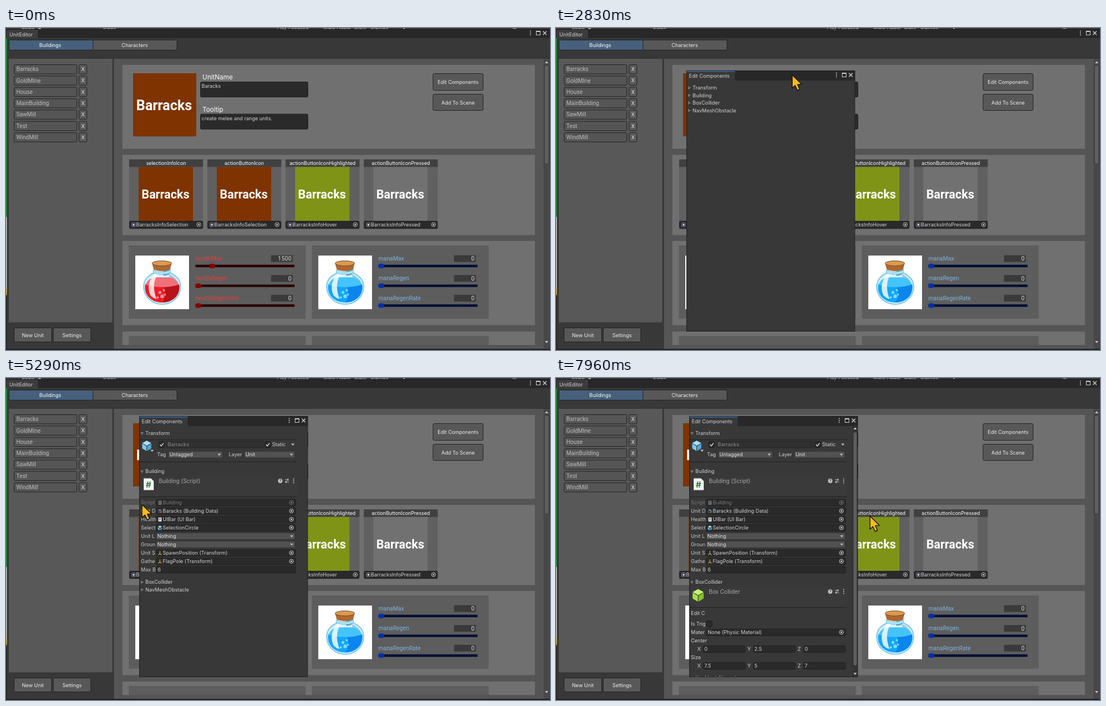
Write an HTML page that moves like this. It is 972 px wide and 576 px high and loops after 8000 ms.

```html
<!DOCTYPE html>
<html lang="en">
<head>
<meta charset="utf-8">
<title>Unit editor</title>
<style>
html, body { margin: 0; width: 100%; height: 100%; overflow: hidden; background: #383838; }
svg { display: block; width: 972px; height: 576px; }
text { white-space: pre; }
</style>
</head>
<body>
<svg id="stage" viewBox="0 0 972 576" xmlns="http://www.w3.org/2000/svg"></svg>
<script>
const LOOP = 8000;
const UI = 'Inter, sans-serif', ALT = 'Roboto, sans-serif';
const DARK = '#2a2a2a', EDGE = '#222';

// Drawing helpers; text is placed by its vertical centre.
const box = (x, y, w, h, fill, extra = '') =>
  `<rect x="${x}" y="${y}" width="${w}" height="${h}" fill="${fill}" ${extra}/>`;
const framed = (x, y, w, h, fill, stroke = EDGE, r = 2) =>
  box(x + .5, y + .5, w - 1, h - 1, fill, `stroke="${stroke}" rx="${r}"`);
const path = (d, fill, extra = '') => `<path d="${d}" fill="${fill}" ${extra}/>`;
const line = (d, stroke, w = 1) => path(d, 'none', `stroke="${stroke}" stroke-width="${w}"`);
const dot = (x, y, r, fill, extra = '') => `<circle cx="${x}" cy="${y}" r="${r}" fill="${fill}" ${extra}/>`;
const text = (x, cy, s, { size = 9, fill = '#d2d2d2', font = UI, anchor = 'start', weight = 400, gap = 0 } = {}) =>
  `<text x="${x}" y="${cy + size * .362}" font-family="${font}" font-size="${size}" font-weight="${weight}"` +
  ` fill="${fill}" text-anchor="${anchor}" letter-spacing="${gap}">${s}</text>`;
const group = (id, body, extra = '') => `<g id="${id}" ${extra}>${body}</g>`;
const range = (n, f) => Array.from({ length: n }, (_, i) => f(i)).join('');

const button = (x, y, w, h, s) =>
  framed(x, y, w, h, '#585858', EDGE, 2.5) + text(x + w / 2, y + h / 2 + .5, s, { anchor: 'middle', fill: '#eee' });
const caret = (x, y, fill = '#c4c4c4') => path(`M${x - 3} ${y - 1.5}h6l-3 3.4z`, fill);
const target = (x, y, c = '#c4c4c4') =>
  dot(x, y, 3.6, 'none', `stroke="${c}"`) + dot(x, y, 1.5, c);
const kebab = (x, y) => range(3, i => box(x - .8, y - 4.3 + i * 3.4, 1.7, 1.7, '#c8c8c8'));
const winButtons = (x, y) => kebab(x, y) +
  box(x + 10.5, y - 3.5, 7, 7, 'none', 'stroke="#ccc"') + box(x + 10, y - 4, 8, 2, '#ccc') +
  line(`M${x + 22.5} ${y - 3.2}l6.4 6.4m0 -6.4l-6.4 6.4`, '#ccc', 1.4);
const cube = (x, y, r, top, left, right) => {
  const w = r * .9, h = r / 2;
  return path(`M${x} ${y - r}l${w} ${h}l${-w} ${h}l${-w} ${-h}z`, top) +
    path(`M${x - w} ${y - h + 1}l${w - .6} ${h}v${r - .6}l${.6 - w} ${-h}z`, left) +
    path(`M${x + w} ${y - h + 1}l${.6 - w} ${h}v${r - .6}l${w - .6} ${-h}z`, right);
};
const blueCube = (x, y, r) => cube(x, y, r, '#a6e0fb', '#7cc8ee', '#4fa6d4');

function potion(x, light, dark, surface, shine) {
  return `<g transform="translate(${x} 0)">` + box(231, 407, 96, 96, '#fff') +
    path('M265 424h28v14c12 5 19 14 19 25a33 31 0 0 1-66 0c0-11 7-20 19-25z', '#d8f1fb', 'stroke="#7cc9ec" stroke-width="2"') +
    path('M281 426h11v14c-5 3-8 3-11 3z', '#5d9db5') +
    path('M290 440c9 3 17 10 19 20l-12-3z', '#9cc9da') +
    path('M249 458q30 10 60 0c4 17-9 33-30 33s-34-16-30-33z', light) +
    path('M282 462q14 0 27-4c4 17-9 33-30 33q9-10 3-29z', dark) +
    path('M249 459q6-12 16-13h28q11 2 16 13q-30 9-60 0z', surface) +
    path('M263 442q6-3 5-12h6q2 10-5 14q-9 17 0 41q-7-2-11-7q-8-18 5-36z', '#fff', 'opacity=".8"') +
    [[275, 473, 2.6], [282, 469, 2], [279, 480, 3.2], [271, 482, 2], [284, 477, 1.8]].map(b => dot(...b, shine)).join('') +
    path('M261 421l3 11q14 6 29 0l3-11z', '#b0672f') +
    `<ellipse cx="278.5" cy="421" rx="17.5" ry="4.5" fill="#d99a52" stroke="#7a4a22"/>` +
    path('M263 433q15 7 31 0v5q-16 6-31 0z', '#aee3f7', 'stroke="#63bde4" stroke-width=".8"') + '</g>';
}

function stats(x, names, values, c) {
  return box(x, 389, 316, 131, '#5d5d5d') + names.map((n, i) => {
    const y = 412 + i * 35.4, v = values[i];
    return text(x + 119, y, n, { size: 10.3, fill: c.label, font: ALT }) +
      box(x + 254, y - 5.5, 39, 12, '#3a3a3a') +
      text(x + 291, y + .6, v, { size: 10.5, font: ALT, anchor: 'end', gap: .3, fill: '#ddd' }) +
      box(x + 119, y + 11.5, 177, 4.5, c.track) +
      box(x + 119 + v / 60, y + 9.7, 10, 8, c.knob, 'rx="3"');
  }).join('');
}

function slot(x, title, color, file) {
  return box(x, 235, 132, 125, '#606060') + box(x, 235, 132, 13.5, '#404040') +
    text(x + 66, 242, title, { size: 8.8, anchor: 'middle', fill: '#fff' }) +
    box(x + 17, 248.5, 97, 97, color) +
    text(x + 65, 297, 'Barracks', { size: 21.4, weight: 600, font: ALT, anchor: 'middle', fill: '#fff' }) +
    framed(x, 345, 132, 14, DARK) +
    framed(x + 4, 348, 8, 8, '#34345a', '#777', 1) + dot(x + 8, 352, 1.7, '#ddd') +
    text(x + 12.5, 352, file) + target(x + 124.5, 351.7);
}

function editor() {
  const cut = [[28, 'Scale'], [173, '0.58x'], [484, 'Play Focused'], [567, 'Mute Audio'], [622, 'Stats'], [651, 'Gizmos'], [905, 'le']];
  const list = ['Barracks', 'GoldMIne', 'House', 'MainBuilding', 'SawMill', 'Test', 'WindMill'];
  const white = { fill: '#fff', size: 11.6 };
  return box(0, 0, 972, 576, '#383838') + box(0, 0, 972, 18, '#282828') +
    box(0, 0, 972, 2, '#3a3a3a') + cut.map(c => text(c[0], -1.3, c[1])).join('') +
    dot(60, 0, 2.5, '#aaa') + caret(711, 0) + box(0, 2, 972, 1, '#191919') +
    box(1, 3, 56, 15, '#3c3c3c') + text(6, 11.5, 'UnitEditor') + winButtons(937, 9) +
    box(0, 18, 1.5, 320, '#169a3c') + box(0, 338, 1.5, 137, '#c9c9c9') + box(0, 466, 1.5, 12, '#c9a227') + box(0, 478, 1.5, 98, '#222') +
    framed(5, 21, 151, 19, '#46607c') + framed(155, 21, 151, 19, '#585858') +
    text(79, 30.5, 'Buildings', { anchor: 'middle', fill: '#fff' }) +
    text(230, 30.5, 'Characters', { anchor: 'middle', fill: '#eee' }) +
    box(5, 54.5, 185, 472, '#585858') + box(193, 54.5, 778, 519.5, '#555') +
    box(5, 54, 185, 1, '#303030') + box(193, 54, 778, 1, '#303030') +
    list.map((s, i) => {
      const y = 65 + i * 20.3;
      return framed(14, y, 113, 17.5, '#555') + text(18.5, y + 8.6, s, { size: 10.1, font: ALT, fill: '#bdbdbd' }) +
        framed(130, y, 15, 17.5, '#585858') + text(137.5, y + 8.8, 'X', { anchor: 'middle', fill: '#eee' });
    }).join('') +
    button(14, 536, 68, 26, 'New Unit') + button(84, 536, 68, 26, 'Settings') +
    [[66, 150], [227, 143.5], [381, 150.5], [543, 24]].map(c => box(208, c[0], 737, c[1], '#707070')).join('') +
    box(227, 81, 113, 113, '#7f3300') +
    text(282.5, 138, 'Barracks', { size: 24.9, weight: 600, font: ALT, anchor: 'middle', fill: '#fff' }) +
    text(351, 88, 'UnitName', white) + framed(347, 96, 193, 28, DARK) + text(349.5, 103.7, 'Baracks') +
    text(351, 146, 'Tooltip', white) + framed(347, 153.5, 193, 28, DARK) + text(349.5, 161.5, 'create melee and range units.') +
    button(762.5, 81, 90.5, 31, 'Edit Components') + button(762.5, 118, 90.5, 30, 'Add To Scene') +
    slot(220, 'selectionInfoIcon', '#7f3300', 'BarracksInfoSelection') +
    slot(359.8, 'actionButtonIcon', '#7f3300', 'BarracksInfoSelection') +
    slot(499.6, 'actionButtonIconHighlighted', '#7f9317', 'BarracksInfoHover') +
    slot(639.4, 'actionButtonIconPressed', '#717171', 'BarracksInfoPressed') +
    stats(219.5, ['healthMax', 'healthRegen', 'healthRegenRate'], [1500, 0, 0], { label: '#e04040', track: '#2b0000', knob: '#850000' }) +
    stats(546.5, ['manaMax', 'manaRegen', 'manaRegenRate'], [0, 0, 0], { label: '#7fb2dc', track: '#000f33', knob: '#0030b0' }) +
    potion(0, '#ee1c25', '#b8121b', '#f0707a', '#f79aa2') + potion(327, '#12a5f8', '#0a86ee', '#45c4fb', '#7fdcff') +
    box(219.5, 551, 316, 16, '#5d5d5d') + box(546.5, 551, 316, 16, '#5d5d5d') +
    box(960.5, 55, 11, 519, '#484848') + framed(961.5, 66, 9, 178, '#5f5f5f', '#333', 3) +
    path('M963 63h6l-3-3.5z', '#ccc') + caret(966, 561 + .5, '#ccc') + box(0, 574, 972, 2, '#202020');
}

// Inspector parts
const field = (y, s, icon = '', c = '#d2d2d2') =>
  framed(268, y - 6.5, 250, 13, DARK, '#212121') + icon + text(icon ? 280 : 271, y, s, { fill: c }) + target(510, y - .2, c);
const popup = (x, y, w, s) =>
  framed(x, y - 6.5, w, 13, '#515151', '#303030') + text(x + 2.5, y, s, { fill: '#e4e4e4' }) + caret(x + w - 6.5, y);
const check = (x, y, on) => framed(x, y - 6, 11.5, 12, DARK, '#1c1c1c') +
  (on ? line(`M${x + 2.7} ${y}l2.3 2.6l4-5.2`, '#ddd', 1.4) : '');
const page = (x, y, c) => box(x - 2.7, y - 3.5, 5.6, 7.2, c) + text(x, y + .2, '#', { size: 5.5, anchor: 'middle', fill: '#333' });
const axes = (x, y, c) => line(`M${x} ${y - 3.5}v4.5l-3 2.5m3 -2.5l3 2.5`, c, 1.2);
const rule = y => box(238, y, 282, 1, '#222');
const header = (y, s) => box(238, y - 8, 282, 36, '#3a3a3a') + rule(y + 28) +
  text(273, y, s, { size: 9.8, fill: '#a8a8a8' }) +
  dot(490, y, 3.9, '#c4c4c4') + text(490, y, '?', { size: 6.5, anchor: 'middle', weight: 700, fill: '#333' }) +
  line(`M498.5 ${y - 2}h7m-7 4h7`, '#c4c4c4', 1.1) + line(`M503.5 ${y - 4}v4m-3 0v4`, '#c4c4c4', 1.3) + kebab(514, y);
const vector = (y, vals) => vals.map((v, i) => {
  const x = 253 + i * 89.6;
  return text(x - .5, y, 'XYZ'[i]) + framed(x + 9.5, y - 6.5, 76, 13, DARK, '#212121') + text(x + 12, y, v);
}).join('');

function transformPart() {
  return rule(110) + blueCube(251.5, 121, 9) + caret(261, 130) + check(272.5, 119, true) +
    framed(286, 112.5, 175, 13, '#303030', '#272727') + text(289, 119, 'Barracks', { fill: '#808080', weight: 500 }) +
    check(462, 119, true) + text(475.5, 119, 'Static') + caret(512.5, 119) +
    text(270, 137, 'Tag') + popup(289.5, 137, 98, 'Untagged') + text(398, 137, 'Layer') + popup(425.5, 137, 91, 'Unit') + rule(149.5);
}

function buildingPart() {
  const labels = ['Script', 'Unit D', 'Health', 'Select', 'Unit L', 'Groun', 'Unit S', 'Gathe', 'Max B'];
  const dim = '#777';
  return header(184, 'Building (Script)') +
    path('M246 179.500h13l5 5v16h-18z', '#f2f2f2') +
    text(254.700, 190.500, '#', { size: 15, anchor: 'middle', weight: 700, fill: '#2f7d3a' }) +
    labels.map((s, i) => text(241, 223 + i * 15, s, { fill: i ? '#c8c8c8' : dim })).join('') +
    field(223, 'Building', page(275, 223, dim), dim) +
    field(238, 'Baracks (Building Data)', cube(275, 238, 3.6, '#5d86a3', '#3b5f78', '#c46b3a')) +
    field(253, 'UIBar (UI Bar)', page(275, 253, '#eee')) +
    field(268, 'SelectionCircle', blueCube(275, 268, 4)) +
    popup(268, 283, 249, 'Nothing') + popup(268, 297.700, 249, 'Nothing') +
    field(313, 'SpawnPosition (Transform)', axes(275, 313, '#d8a24a')) +
    field(328, 'FlagPole (Transform)', axes(275, 328, '#d8a24a')) +
    framed(268, 336.5, 250, 13, DARK, '#212121') + text(271, 343, '6');
}

function colliderPart() {
  return header(382, 'Box Collider') + cube(254, 388.5, 11, '#c5f06f', '#a5e04a', '#82c02d') +
    text(241, 421, 'Edit C') + text(241, 440, 'Is Trig') + check(268, 440, false) +
    text(241, 455, 'Mater') + field(455, 'None (Physic Material)') +
    text(241, 470, 'Center') + vector(485, ['0', '2.5', '0']) +
    text(241, 500, 'Size') + vector(515, ['7.5', '5', '7']) +
    box(530, 86, 9, 449, '#333') + framed(530.5, 96, 8, 419, '#5f5f5f', '#2a2a2a', 3) +
    path('M531.500 92h6l-3-3.500z', '#ccc') + caret(534.5, 529, '#ccc');
}

const FOLDS = ['Transform', 'Building', 'BoxCollider', 'NavMeshObstacle'];
const fold = (s, i) => group('fold' + i,
  path('M-2 -3l5 3l-5 3z', '#747474', `id="tri${i}"`) + text(249, 0, s));

function inspector() {
  return box(238, 68, 301.5, 467, '#383838') + box(238, 68, 301.5, 18, '#282828') +
    box(238, 69, 86.5, 17, '#383838') + box(238, 69, 86.5, 1.3, '#3a79bb') +
    text(242.5, 78, 'Edit Components') + winButtons(506, 76) +
    group('part0', transformPart()) + group('part1', buildingPart()) + group('part2', colliderPart()) +
    FOLDS.map(fold).join('') + box(238.5, 68.5, 300.5, 466, 'none', 'stroke="#1c1c1c"');
}

const stage = document.getElementById('stage');
stage.innerHTML = `<clipPath id="frame">${box(238, 68, 301.5, 467, '#000')}</clipPath>` + editor() +
  group('win', group('body', inspector(), 'clip-path="url(#frame)"')) +
  group('cursor', path('M0 0v23.500l5.200-4.700l4 8.700l4.200-2l-3.900-8.300l7.300-.6z', '#fdbb14', 'stroke="#111" stroke-width="1.4" stroke-linejoin="round"'));
const $ = id => document.getElementById(id);
const show = (id, on) => $(id).setAttribute('display', on ? 'inline' : 'none');
const move = (id, x, y) => $(id).setAttribute('transform', `translate(${x} ${y})`);

// Cursor path: time, x, y
const KEYS = [
  [410, 591, 475], [1170, 822, 90], [1410, 822, 90], [2080, 367, 140], [2440, 367, 140],
  [2830, 422, 84], [2960, 427, 76], [3110, 427, 76], [3880, 219, 135], [3980, 219, 135],
  [4220, 241, 93], [4380, 241, 99], [4880, 240, 166], [5010, 240, 166], [5290, 243, 226],
  [5560, 233, 310], [5830, 242, 365], [5960, 242, 365], [6290, 268, 377], [6440, 268, 377],
  [6830, 513, 245], [7290, 531, 221], [7330, 531, 221], [7630, 553.5, 245.5], [7820, 553.5, 245.5],
  [7960, 561, 247], [8000, 561, 247]
];
const OPEN = 1500, EXPAND = [4250, 5030, 5960];

const slope = (i, k) => KEYS[i] && KEYS[i + 1] ? (KEYS[i + 1][k] - KEYS[i][k]) / (KEYS[i + 1][0] - KEYS[i][0]) : 0;
function tangent(i, k) {
  const a = slope(i - 1, k), b = slope(i, k);
  return a * b > 0 ? 2 * a * b / (a + b) : 0;
}
function along(t, k) {
  let i = 0;
  while (i < KEYS.length - 2 && t >= KEYS[i + 1][0]) i++;
  const [a, b] = [KEYS[i], KEYS[i + 1]], d = b[0] - a[0];
  const u = Math.min(1, Math.max(0, (t - a[0]) / d)), s = u * u * (3 - 2 * u);
  return a[k] * (1 - s) + b[k] * s + d * u * (1 - u) * ((1 - u) * tangent(i, k) - u * tangent(i + 1, k));
}

function draw(t) {
  const x = along(t, 1), y = along(t, 2);
  show('cursor', t >= 460);
  move('cursor', x, y);

  show('win', t >= OPEN);
  if (t < 2440) move('win', -60, 64);
  else if (t < 3000) move('win', Math.round(x - 427), Math.round(y - 76));
  else move('win', 0, 0);

  const grow = [54.7, 184.5, 158];
  let top = 99;
  FOLDS.forEach((_, i) => {
    const open = t >= EXPAND[i];
    move('fold' + i, 0, top);
    $('tri' + i).setAttribute('transform', `translate(243 0) rotate(${open ? 90 : 0})`);
    if (i < 3) show('part' + i, open);
    top += 13.5 + (open ? grow[i] : 0);
  });
}

function tick() {
  draw(performance.now() % LOOP);
  requestAnimationFrame(tick);
}
tick();
</script>
</body>
</html>
```
